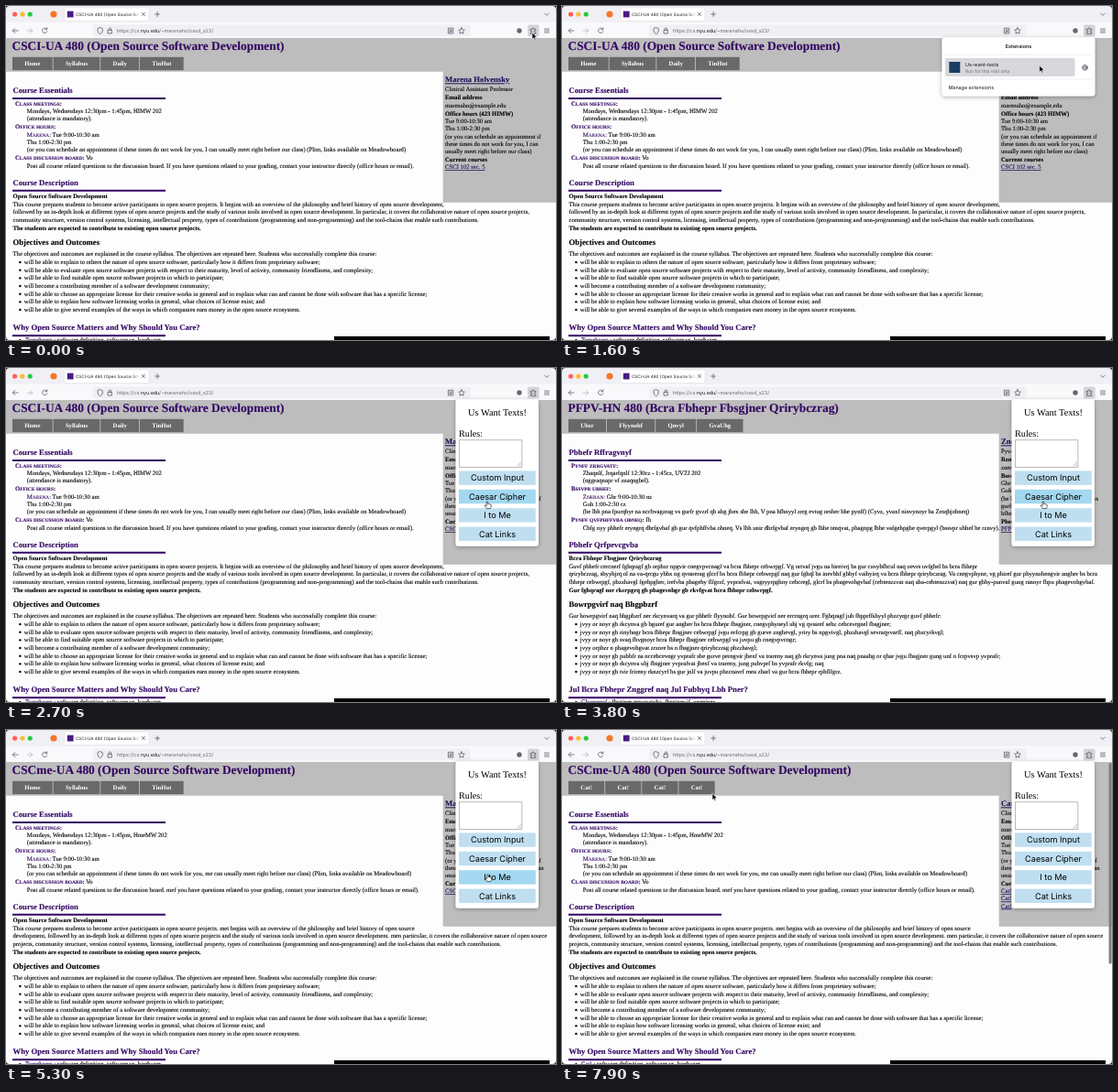
An HTML page that plays this animation: 600 by 365 pixels, repeating every 8 s.

```html
<!DOCTYPE html>
<html lang="en">
<head>
<meta charset="utf-8">
<title>Word extension demo</title>
<style>
html, body { margin: 0; width: 100%; height: 100%; overflow: hidden; background: #fdfdfd; }
svg { display: block; width: 600px; height: 365px; }
text { white-space: pre; text-rendering: geometricPrecision; }
.page text { font: 6.69px "Liberation Serif", "Times New Roman", serif; }
.page text, .page tspan { fill: currentColor; stroke: currentColor; stroke-width: .1; }
.page .b { font-weight: bold; }
.page .h1 { font-size: 13.39px; font-weight: bold; color: #330662; }
.page .h2 { font-size: 8.667px; font-weight: bold; color: #330662; }
.page .h3 { font-size: 8.7px; font-weight: bold; }
.page .name { font-size: 8.667px; font-weight: bold; }
.page .link { color: #1c0f58; text-decoration: underline; }
.page .plain { color: #1c0f58; }
.page .label { color: #330662; font-weight: bold; }
.page .who { color: #330662; }
.page .small { font-size: 5.35px; }
.page .nav text { font-weight: bold; color: #fff; stroke: none; }
.ui text { font-family: Inter, "Liberation Sans", sans-serif; font-size: 5.4px; fill: #15141a; }
.ui .tab { font-size: 4.6px; }
.ui .dim { fill: #66666f; }
.ui .note { font-size: 4.9px; fill: #6c6c76; }
.ui .icon { fill: none; stroke: #55555f; stroke-width: .75; stroke-linecap: round; stroke-linejoin: round; }
.ui .serif { font-family: "Liberation Serif", "Times New Roman", serif; fill: #000; }
.ui .btn { font-size: 9.17px; fill: #000; }
.mid { text-anchor: middle; }
</style>
</head>
<body>
<svg viewBox="0 0 600 365">
  <defs>
    <filter id="shadow" x="-10%" y="-10%" width="120%" height="125%">
      <feDropShadow dx="0" dy="1" stdDeviation="2.2" flood-color="#000" flood-opacity=".33"/>
    </filter>
    <linearGradient id="fade"><stop offset="0" stop-color="#fff" stop-opacity="0"/><stop offset="1" stop-color="#fff"/></linearGradient>
  </defs>
  <rect width="600" height="365" fill="#fdfdfd"/>

  <g class="page">
    <path d="M0 35H600V214.7H476.7V71.8H0Z" fill="#bdbdbd"/>
    <path d="M7 101H174M7 201.8H174M7 360.2H174" stroke="#330662" stroke-width="2"/>
    <rect x="358" y="361" width="235" height="4" fill="#000"/>
    <g class="nav" id="nav"></g>
    <g id="copy"></g>
  </g>
  <rect id="scroll" x="596.6" y="36" width="3" height="219.5" rx="1.5" fill="#7c7c7c"/>

  <g class="ui">
    <rect width="600" height="18" fill="#f0f0f4"/>
    <rect y="17.7" width="600" height="17.3" fill="#f9f9fb"/>
    <circle cx="9.6" cy="9" r="2.6" fill="#ff5f57"/>
    <circle cx="17.9" cy="9" r="2.6" fill="#febc2e"/>
    <circle cx="26.2" cy="9" r="2.6" fill="#28c840"/>
    <circle cx="52" cy="9" r="3.6" fill="#f5762b"/>
    <rect x="63.5" y="2" width="92.5" height="14.4" rx="1.8" fill="#fff" stroke="#d2d2da" stroke-width=".4"/>
    <rect x="66.8" y="5.6" width="6.8" height="6.8" fill="#4b1a86"/>
    <text class="tab" x="76" y="10.7">CSCI-UA 480 (Open Source Sof</text>
    <rect x="138" y="4" width="8" height="10" fill="url(#fade)"/>
    <rect x="146" y="4" width="9" height="10" fill="#fff"/>
    <path class="icon" d="M148.3 7.3l3.2 3.2m0-3.2l-3.2 3.2M162.6 9h5M165.1 6.5v5M587.6 8l2.3 2.3L592.2 8"/>
    <rect x="95" y="20.6" width="411.5" height="12.7" rx="1.8" fill="#f0f0f4"/>
    <path class="icon" d="M13 27H7.3m2.6-2.6L7.3 27l2.6 2.6"/>
    <path class="icon" opacity=".4" d="M23 27h5.7m-2.6-2.6l2.6 2.6-2.6 2.6"/>
    <path class="icon" d="M44.4 25.2a2.7 2.7 0 1 0 .4 2.6M44.8 23.7v2h-2"/>
    <path class="icon" d="M102.7 23.7l2.6 1v2.3q0 2.4-2.6 3.7q-2.6-1.3-2.6-3.7v-2.3z"/>
    <path class="icon" d="M111.4 26.4h4v3.6h-4zM112.2 26.4v-1.3a1.2 1.2 0 0 1 2.4 0v1.3"/>
    <text class="dim" x="121" y="28.8">https://cs.<tspan fill="#15141a">nyu.edu</tspan>/~marenaho/ossd_s23/</text>
    <path class="icon" d="M482.8 24.2h5v5.8h-5zM484 26h2.6M484 27.3h2.6M484 28.6h1.6"/>
    <path class="icon" d="M497 23.7l1 2.2 2.3.3-1.7 1.6.4 2.4-2-1.2-2 1.2.4-2.4-1.7-1.6 2.3-.3z"/>
    <circle cx="560" cy="27" r="2.7" fill="#66666f"/>
    <rect x="569" y="20.6" width="12.6" height="12.7" rx="1.7" fill="#d3d3d9"/>
    <path class="icon" d="M572.4 25.4h1.7v-.7a.9.9 0 0 1 1.8 0v.7h1.9v1.6h-.6a.9.9 0 0 0 0 1.8h.6v1.6h-5.4v-1.5h.6a.9.9 0 0 0 0-1.8h-.6z"/>
    <path class="icon" d="M587.5 25h5M587.5 27h5M587.5 29h5"/>

    <g id="menu">
      <rect x="414.5" y="34.2" width="167" height="64.3" rx="3" fill="#fff" filter="url(#shadow)"/>
      <text class="mid" x="498" y="46.2" font-weight="600">Extensions</text>
      <path d="M418 53.3H578M418 80H578" stroke="#dedee3" stroke-width=".5"/>
      <rect id="item" x="418" y="57" width="141.5" height="20" rx="1.7" fill="#d7d7dc"/>
      <rect x="422.3" y="61" width="12" height="12" fill="#173f63"/>
      <text x="440" y="65.7">Us-want-texts</text>
      <text class="note" x="440" y="72.6">Run for this visit only</text>
      <circle class="icon" cx="570.5" cy="67.3" r="2.3"/>
      <circle class="icon" cx="570.5" cy="67.3" r="3" stroke-dasharray="1.18 1.18"/>
      <circle class="icon" cx="570.5" cy="67.3" r=".8"/>
      <text x="421.5" y="90.5">Manage extensions</text>
    </g>

    <g id="panel">
      <rect x="490.5" y="34.2" width="90.5" height="160.6" rx="3" fill="#fff" filter="url(#shadow)"/>
      <text class="serif mid" x="536" y="52.3" style="font-size:10.4px">Us Want Texts!</text>
      <text class="serif" x="494" y="74.5" style="font-size:10.2px">Rules:</text>
      <rect x="494.3" y="78.8" width="68.6" height="29.5" fill="#fff" stroke="#8b8b8b" stroke-width=".6"/>
      <path d="M557.5 107.3l4.5-4.5M560 107.3l2-2" stroke="#777" stroke-width=".5"/>
      <g id="buttons"></g>
    </g>
  </g>

  <path id="arrow" d="M0 0V7.3L1.7 5.8L2.8 8.3L4 7.8L2.9 5.3H5.2Z" fill="#000" stroke="#fff" stroke-width=".6"/>
  <path id="hand" d="M-.8 .2Q0-.6 .7 .2V2.7Q1.5 2.2 2 2.9Q2.8 2.6 3.2 3.2Q4 3 4.2 3.8V5.5Q4 6.6 3.4 7.6H-.5Q-1.6 6-2.8 4.5Q-2.7 3.5-1.6 3.9L-.8 4.7Z" fill="#fff" stroke="#000" stroke-width=".6"/>
  <path d="M0 0H600V365H0ZM4 0Q0 0 0 4V361Q0 365 4 365H596Q600 365 600 361V4Q600 0 596 0Z" fill="#333" fill-rule="evenodd"/>
</svg>

<script>
const LOOP = 8000, STEP = 100;
const $ = id => document.getElementById(id);

function add(parent, tag, attrs, text) {
  const el = document.createElementNS('http://www.w3.org/2000/svg', tag);
  for (const key in attrs) el.setAttribute(key, attrs[key]);
  if (text !== undefined) el.textContent = text;
  parent.appendChild(el);
  return el;
}

// Rewriting rules
const rot13 = s => s.replace(/[a-z]/gi, c => {
  const base = c < 'a' ? 65 : 97;
  return String.fromCharCode((c.charCodeAt(0) - base + 13) % 26 + base);
});
const toMe = s => s.replace(/I/g, 'me');
const rules = { plain: s => s, caesar: rot13, me: toMe, cat: toMe };

// Each row: x, baseline, class, runs; a run is a string or [string, class]
const link = 'link';
const rows = [
  [6.5, 48.2, 'h1', 'CSCI-UA 480 (Open Source Software Development)'],
  [7.5, 94.8, 'h2', 'Course Essentials'],
  [10, 108.7, '', ['Class meetings:', 'label']],
  [22.8, 116.8, '', 'Mondays, Wednesdays 12:30pm - 1:45pm, HIMW 202'],
  [22.8, 125, '', '(attendance is mandatory).'],
  [10, 134.2, '', ['Office hours:', 'label']],
  [22.8, 142.7, '', ['Marena:', 'who'], ' Tue 9:00-10:30 am'],
  [22.8, 151, '', 'Thu 1:00-2:30 pm'],
  [22.8, 158.9, '', '(or you can schedule an appointment if these times do not work for you, I can usually meet right before our class) (Plim, links available on Meadowboard)'],
  [10, 168.4, '', ['Class discussion board:', 'label'], ' Vo'],
  [22.8, 176.6, '', 'Post all course related questions to the discussion board. If you have questions related to your grading, contact your instructor directly (office hours or email).'],
  [7.5, 195.7, 'h2', 'Course Description'],
  [7.5, 209.9, 'b', 'Open Source Software Development'],
  [7.5, 244.9, 'b', 'The students are expected to contribute to existing open source projects.'],
  [7.5, 261, 'h3', 'Objectives and Outcomes'],
  [7.5, 272.6, '', 'The objectives and outcomes are explained in the course syllabus. The objectives are repeated here. Students who successfully complete this course:'],
  [7.5, 354, 'h2', 'Why Open Source Matters and Why Should You Care?'],
  [21, 367.4, '', ['Tomebarns', 'plain'], ' : software definition, software vs. hardware'],
  [479, 83.4, 'name', ['Marena Holvensky', link]],
  [479, 92.5, '', 'Clinical Assistant Professor'],
  [479, 102.3, 'b', 'Email address'],
  [479, 110.6, '', 'marenaho@example.edu'],
  [479, 120.2, 'b', 'Office hours (423 HIMW)'],
  [479, 128.3, '', 'Tue 9:00-10:30 am'],
  [479, 136.4, '', 'Thu 1:00-2:30 pm'],
  [479, 144.5, '', '(or you can schedule an appointment if'],
  [479, 152.6, '', 'these times do not work for you, I can'],
  [479, 160.7, '', 'usually meet right before our class)'],
  [479, 170.1, 'b', 'Current courses'],
  [479, 178.3, '', ['CSCI 102 sec. 5', link]]
];
const extraLinks = [186.4, 194.5].map(y => [479, y, '', ['Cat!', link]]);
const outcomes = [
  'will be able to explain to others the nature of open source software, particularly how it differs from proprietary software;',
  'will be able to evaluate open source software projects with respect to their maturity, level of activity, community friendliness, and complexity;',
  'will be able to find suitable open source software projects in which to participate;',
  'will become a contributing member of a software development community;',
  'will be able to choose an appropriate license for their creative works in general and to explain what can and cannot be done with software that has a specific license;',
  'will be able to explain how software licensing works in general, what choices of license exist; and',
  'will be able to give several examples of the ways in which companies earn money in the open source ecosystem.'
];
const outcomeY = i => 282.1 + i * 8.67;
outcomes.forEach((s, i) => rows.push([19.8, outcomeY(i), '', s]));
const bulletYs = [...outcomes.map((s, i) => outcomeY(i)), 367.4];

const summary = 'This course prepares students to become active participants in open source projects. It begins with an overview of the philosophy and brief history of open source development, followed by an in-depth look at different types of open source projects and the study of various tools involved in open source development. In particular, it covers the collaborative nature of open source projects, community structure, version control systems, licensing, intellectual property, types of contributions (programming and non-programming) and the tool-chains that enable such contributions.';

// Word wrap; the first line stops short of the sidebar
function addSummary(mode) {
  let y = 219, limit = 472, line = add($('copy'), 'text', { x: 7.5, y });
  for (const word of rules[mode](summary).split(' ')) {
    const before = line.textContent;
    line.textContent = before ? before + ' ' + word : word;
    if (line.getComputedTextLength() <= limit) continue;
    line.textContent = before;
    limit = 588;
    y += 8.4;
    line = add($('copy'), 'text', { x: 7.5, y }, word);
  }
}

function addRun(line, run, mode) {
  const [source, cls] = Array.isArray(run) ? run : [run, ''];
  const isLink = cls === link || cls === 'plain';
  const text = mode === 'cat' && isLink ? 'Cat!' : rules[mode](source);
  if (cls !== 'label' && cls !== 'who') return add(line, 'tspan', { class: cls }, text);
  // Small capitals
  for (const part of text.match(/[a-z]+|[^a-z]+/g)) {
    const small = /[a-z]/.test(part);
    add(line, 'tspan', { class: cls + (small ? ' small' : '') }, part.toUpperCase());
  }
}

let shownMode = '';
function setMode(mode) {
  if (mode === shownMode) return;
  shownMode = mode;
  $('copy').textContent = $('nav').textContent = '';
  for (const [x, y, cls, ...runs] of mode === 'cat' ? rows.concat(extraLinks) : rows) {
    const line = add($('copy'), 'text', { x, y, class: cls });
    runs.forEach(run => addRun(line, run, mode));
  }
  for (const y of bulletYs) add($('copy'), 'circle', { cx: 15.4, cy: y - 2.1, r: 1.2 });
  addSummary(mode);
  let x = 7;
  for (const name of ['Home', 'Syllabus', 'Daily', 'TinHut']) {
    const box = add($('nav'), 'rect', { x, y: 55.8, height: 14.4, fill: '#696969' });
    const label = add($('nav'), 'text', { x: x + 13.3, y: 65 }, mode === 'cat' ? 'Cat!' : rules[mode](name));
    const width = label.getComputedTextLength() + 26.6;
    box.setAttribute('width', width);
    x += width + 0.9;
  }
}

const buttons = ['Custom Input', 'Caesar Cipher', 'I to Me', 'Cat Links'].map((name, i) => {
  const y = 112.4 + i * 20.4;
  const el = add($('buttons'), 'rect', { x: 494, y, width: 83.8, height: 15.4 });
  add($('buttons'), 'text', { x: 536, y: y + 11, class: 'btn mid' }, name);
  return { el, y };
});

// Pointer stops: time, x, y
const stops = [
  [0, 574, 29], [900, 574, 29], [1600, 520.8, 65], [1900, 520.8, 65], [2600, 525, 146],
  [4700, 525, 146], [5000, 525.5, 158], [5800, 525.5, 158], [6300, 528, 178.5],
  [7000, 528, 178.5], [7500, 28, 64], [7900, 164, 69.3], [LOOP, 164, 69.3]
];
function pointerAt(t) {
  const i = stops.findIndex(s => s[0] > t);
  const [t0, x0, y0] = stops[i - 1], [t1, x1, y1] = stops[i];
  const k = (t - t0) / (t1 - t0), e = k * k * (3 - 2 * k);
  return [x0 + (x1 - x0) * e, y0 + (y1 - y0) * e];
}

const within = (x, y, left, top, right, bottom) => x >= left && x <= right && y >= top && y <= bottom;
const show = (id, on) => $(id).setAttribute('visibility', on ? 'visible' : 'hidden');

function draw(t) {
  setMode(t < 3100 ? 'plain' : t < 4000 ? 'caesar' : t < 5200 ? 'plain' : t < 6900 ? 'me' : 'cat');
  const [x, y] = pointerAt(t), panel = t >= 1900;

  show('menu', t >= 500 && !panel);
  $('menu').setAttribute('opacity', Math.min(1, Math.max(0, (t - 400) / 200)));
  $('item').setAttribute('opacity', within(x, y, 418, 57, 559.5, 77) ? 1 : 0);
  show('panel', panel);
  show('scroll', t >= 7400);

  let over = within(x, y, 7, 56, 166, 70) && t < 7900;
  for (const b of buttons) {
    const hit = panel && within(x, y, 494, b.y, 577.8, b.y + 15.4);
    b.el.setAttribute('fill', hit ? '#a3d8f0' : '#bfdff1');
    over = over || hit;
  }
  show('hand', over);
  show('arrow', !over);
  for (const id of ['hand', 'arrow']) $(id).setAttribute('transform', `translate(${x} ${y})`);
}

const begin = performance.now();
function tick() {
  const t = (performance.now() - begin) % LOOP;
  draw(Math.floor(t / STEP) * STEP);
  requestAnimationFrame(tick);
}
tick();
</script>
</body>
</html>
```
